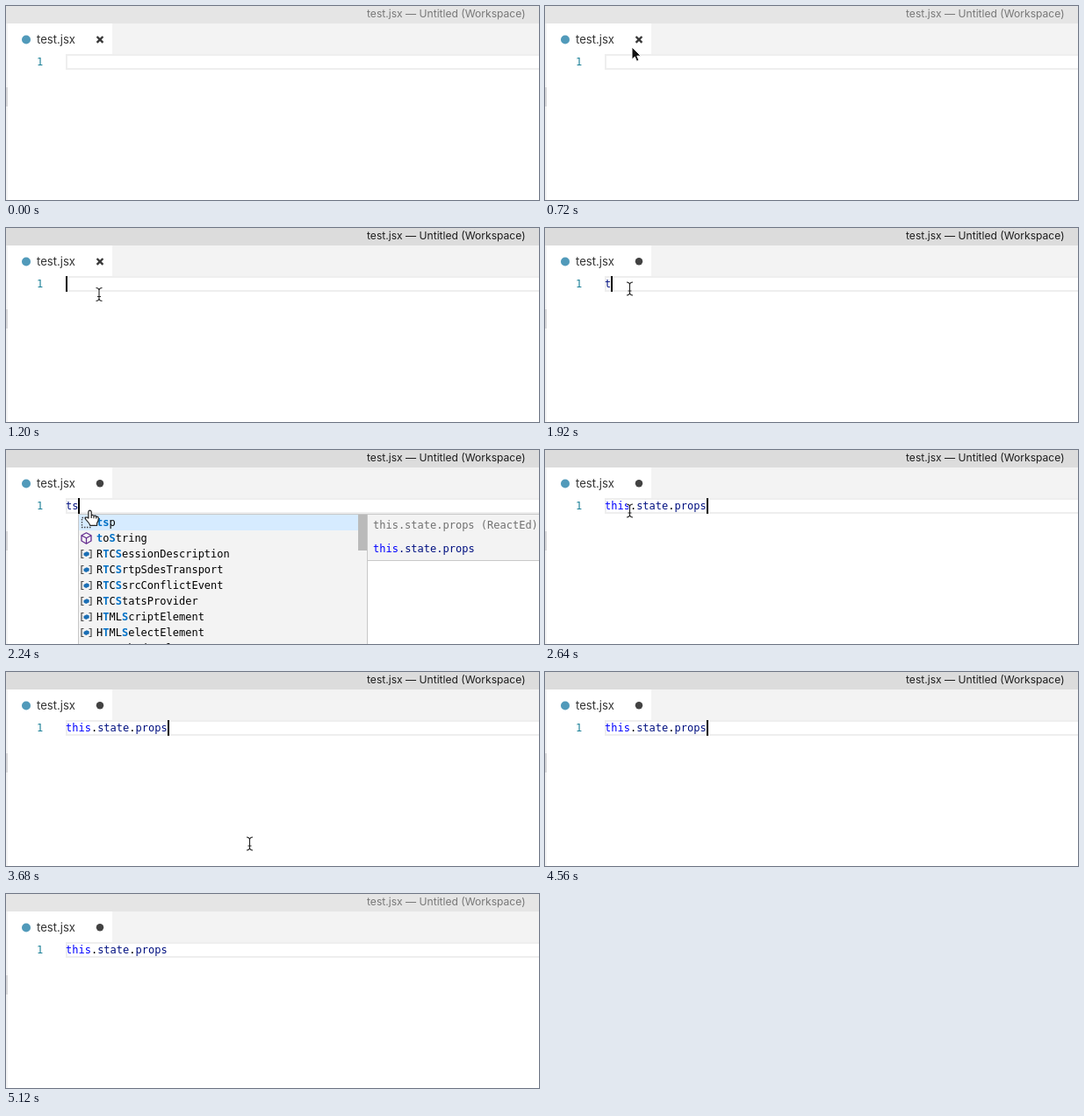
Recreate the animation shown at these times as an HTML page. Size 607 px wide and 222 px high, loop 5.28 s.

```html
<!DOCTYPE html>
<html lang="en">
<head>
<meta charset="utf-8">
<title>Snippet completion</title>
<style>
  html, body { margin: 0; width: 100%; height: 100%; overflow: hidden; background: #fff; }
  svg { display: block; width: 607px; height: 222px; }
  text { white-space: pre; }
  .ui { font-family: Inter, Roboto, sans-serif; }
  .code { font: 12px "DejaVu Sans Mono", "Liberation Mono", monospace; }
  .keyword { fill: #0000ff; }
  .member { fill: #001080; }
  .match { fill: #0070c6; font-weight: bold; }
  .panel { fill: #f3f3f3; stroke: #c8c8c8; }
</style>
</head>
<body>
<svg viewBox="0 0 607 222">
  <defs>
    <g id="variable">
      <path d="M3.5 .5H1V9.5H3.5M9.5 .5H12V9.5H9.5" fill="none" stroke="#4b4b4b" stroke-width="1.2"/>
      <path d="M3.5 4L7 2.3 9.7 3.6V6.2L6.2 7.9 3.5 6.5Z" fill="#1b6fb5"/>
    </g>
    <g id="method" fill="none" stroke="#652d90" stroke-width="1.3" stroke-linejoin="round">
      <path d="M6.5 -1.2L12 1.8V8L6.5 11.2 1 8V1.8ZM1 1.8L6.5 4.8 12 1.8M6.5 4.8V11.2"/>
    </g>
    <g id="snippet">
      <path d="M1.5 -.5H11.5V10.5H1.5Z" fill="none" stroke="#424242" stroke-width="1.3" stroke-dasharray="1.5 1.5"/>
    </g>
    <path id="beamShape" d="M-3.5 -7.5Q-.5 -7.5 0 -5 .5 -7.5 3.5 -7.5M-3.5 7.5Q-.5 7.5 0 5 .5 7.5 3.5 7.5M0 -5V5M-2 2.5H2"/>
  </defs>

  <rect width="607" height="222" fill="#fff"/>
  <rect id="titleBar" width="607" height="20"/>
  <text id="title" class="ui" x="411" y="13" font-size="12.1">test.jsx — Untitled (Workspace)</text>
  <rect y="20" width="607" height="35" fill="#f3f3f3"/>
  <rect y="55" width="2" height="167" fill="#f3f3f3"/>
  <rect y="93" width="2" height="22" fill="#d6d6d8"/>
  <rect x="2" y="20" width="119" height="35" fill="#fff"/>
  <circle cx="23" cy="38.5" r="5" fill="#519aba"/>
  <text class="ui" x="35" y="43" font-size="13.1" fill="#333">test.jsx</text>
  <path id="closeMark" d="M103.6 35L110.4 41.8M110.4 35L103.6 41.8" stroke="#383838" stroke-width="2.4"/>
  <circle id="dirtyDot" cx="107" cy="38.3" r="4.2" fill="#424242"/>

  <rect x="69" y="56" width="550" height="16" fill="none" stroke="#eee" stroke-width="2"/>
  <text class="code" x="35" y="68" fill="#1f8299">1</text>
  <text id="line" class="code" x="68" y="68"></text>
  <rect id="caret" y="55" width="2" height="18"/>

  <g id="popup">
    <rect class="panel" x=".5" y="73.5" width="329" height="170"/>
    <rect x="1" y="74" width="328" height="18" fill="#d6ebff"/>
    <g id="rows"></g>
    <rect x="319" y="74" width="10" height="41" fill="#bababa"/>
    <g id="details">
      <rect class="panel" x="329.5" y="73.5" width="210" height="53"/>
      <text class="code" x="336" y="90" fill="#707070">this.state.props (ReactEd)</text>
      <text class="code" x="336" y="117"><tspan class="keyword">this</tspan><tspan class="member">.state.props</tspan></text>
    </g>
  </g>

  <g id="pointer" stroke-linejoin="round">
    <path id="arrow" d="M0 0V14.2L3.3 11.2 5.5 16.3 8 15.2 5.8 10.2H10.2Z" fill="#111" stroke="#fff"/>
    <g id="beam" fill="none">
      <use href="#beamShape" stroke="#fff" stroke-width="2.6"/>
      <use href="#beamShape" stroke="#222" stroke-width="1.1"/>
    </g>
    <path id="hand" d="M-2.6 8.5V1.3Q-2.4 -.4 -1 -.4T.7 1.3V5.5Q2.3 4.2 3.5 6 5.3 5 6.2 6.8 8.8 6.2 8.8 9 8.8 12.4 7.1 14.2V16.8H-.7Q-1.6 14.2 -5.5 10.2 -7 8.2 -5.4 7.6 -4.2 7.2 -2.6 8.5ZM.7 5.5V8.5M3.5 6V8.7M6.2 6.8V9" fill="#fff" stroke="#222" stroke-width="1.2"/>
  </g>
</svg>
<script>
const LOOP = 5280, STEP = 80, CHAR = 7.224, LEFT = 68;
const $ = id => document.getElementById(id);
const show = (id, on) => $(id).setAttribute("visibility", on ? "visible" : "hidden");
const between = (t, from, to) => t >= from && t < to;

const words = ["tsp", "toString", "RTCSessionDescription", "RTCSrtpSdesTransport",
  "RTCSsrcConflictEvent", "RTCStatsProvider", "HTMLScriptElement", "HTMLSelectElement",
  "HTMLShadowElement", "HTMLSpanElement", "SVGTSpanElement", "TextTrackCueSpan"];

// time, x, y
const path = [
  [160, 262, 212], [320, 215, 160], [480, 150, 95], [640, 106, 56], [720, 99, 47],
  [880, 100, 58], [1040, 106, 76], [1200, 106, 76], [1280, 96.5, 69.5], [3040, 96.5, 69.5],
  [3360, 160, 95], [3600, 258, 179], [3680, 277.5, 196.5], [3760, 289, 214], [3840, 300, 240]
];

function pointerAt(t) {
  const i = path.findIndex(p => p[0] > t);
  if (i < 1) return null;
  const [t0, x0, y0] = path[i - 1], [t1, x1, y1] = path[i];
  const k = (t - t0) / (t1 - t0);
  return [x0 + (x1 - x0) * k, y0 + (y1 - y0) * k];
}

// Marks the typed letters in order; null when the word does not contain them.
function highlight(word, typed) {
  let n = 0;
  const html = [...word].map(c =>
    c.toLowerCase() === typed[n] ? (n++, `<tspan class="match">${c}</tspan>`) : c).join("");
  return n === typed.length ? html : null;
}

function listRows(typed) {
  return words.map(word => [word, highlight(word, typed)]).filter(row => row[1]).slice(0, 9)
    .map(([word, html], i) => {
      const icon = { tsp: "snippet", toString: "method" }[word] || "variable";
      return `<use href="#${icon}" x="3" y="${78 + i * 18}"/>` +
        `<text class="code" x="21" y="${87 + i * 18}">${html}</text>`;
    }).join("");
}

const rowsFor = { ts: listRows("ts"), tsp: listRows("tsp") };
const member = name => `<tspan class="member">${name}</tspan>`;
const done = `<tspan class="keyword">this</tspan>.${member("state")}.${member("props")}`;

function typedAt(t) {
  if (t < 1920) return "";
  if (t < 2000) return "t";
  if (t < 2400) return "ts";
  return t < 2640 ? "tsp" : "this.state.props";
}

function caretOn(t) {
  if (t < 1920) return between(t, 1120, 1600);
  return t < 2640 || (t < 5040 && Math.floor((t - 2640) / 480) % 2 === 0);
}

function draw(t) {
  const focused = between(t, 1120, 5040);
  $("titleBar").setAttribute("fill", focused ? "#dcdcdc" : "#e5e5e5");
  $("title").setAttribute("fill", focused ? "#1c1c1c" : "#777");

  const typed = typedAt(t), caretX = LEFT + Math.round(typed.length * CHAR);
  show("closeMark", !typed);
  show("dirtyDot", typed);
  $("line").innerHTML = t < 2640 ? member(typed) : done;
  $("caret").setAttribute("x", caretX);
  show("caret", caretOn(t));

  const open = between(t, 2080, 2640);
  show("popup", open);
  show("details", between(t, 2160, 2640));
  if (open) {
    $("popup").setAttribute("transform", `translate(${caretX})`);
    $("rows").innerHTML = rowsFor[t < 2480 ? "ts" : "tsp"];
  }

  const pos = pointerAt(t), hand = between(t, 2240, 2640);
  if (pos) $("pointer").setAttribute("transform", `translate(${pos})`);
  show("arrow", pos && t < 1200);
  show("beam", pos && t >= 1200 && !hand);
  show("hand", pos && hand);
}

let last = -1;
const start = performance.now();
function tick() {
  const t = Math.floor((performance.now() - start) % LOOP / STEP) * STEP;
  if (t !== last) draw(last = t);
  requestAnimationFrame(tick);
}
tick();
</script>
</body>
</html>
```
